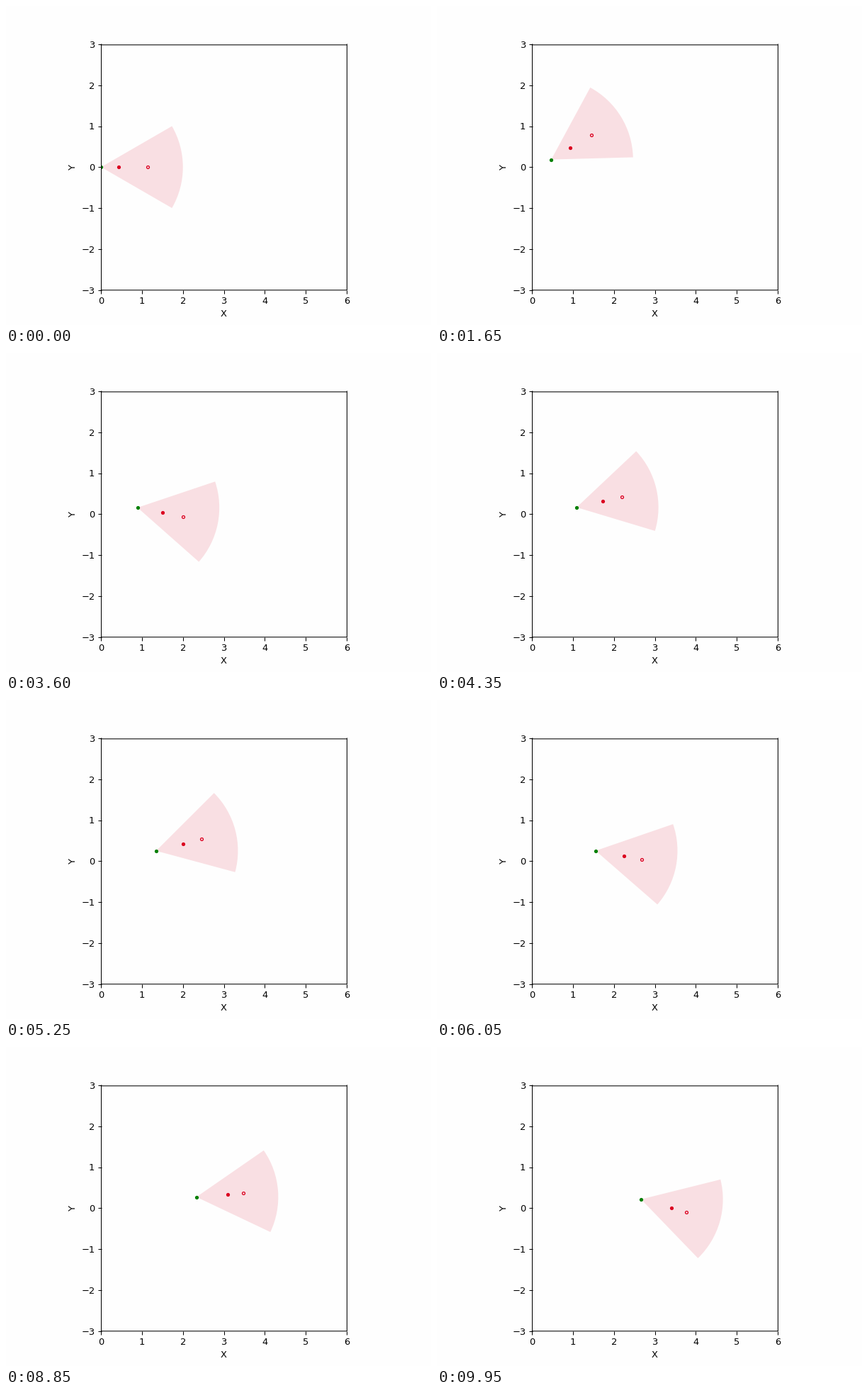
Recreate the animation shown at these times as a matplotlib script. Size 600 px wide and 450 px high, loop 10 s.

```python
import numpy as np
import matplotlib.pyplot as plt
from matplotlib.animation import FuncAnimation
from matplotlib.patches import Wedge

TICKS, TICK_MS = 200, 50
STEPS = 150            # poses per loop, 15 per second
RADIUS, HALF_FOV = 2.0, 30
AIM_DIST = 1.145
RED, PAPER = "#db0020", "#fefefe"

OMEGA = 2 * np.pi * 3 / (STEPS - 1)
SPEED, SWAY = 0.0201, 0.232


def target(k):
    return 0.42 + SPEED * k, SWAY * (1 - np.cos(OMEGA * k))


def gap(k):
    """Distance between the follower and the target."""
    return 0.85 - 0.43 * np.exp(-0.0122 * k)


def pursuit_angles(sub=10):
    """Bearing of a follower dragged behind the target, one per step."""
    angle, out = 0.0, []
    for i in range(STEPS * sub):
        if i % sub == 0:
            out.append(angle)
        k = (i + 0.5) / sub
        vy = SWAY * OMEGA * np.sin(OMEGA * k)
        turn = vy * np.cos(angle) - SPEED * np.sin(angle)
        angle += turn / gap(k) / sub
    return np.array(out)


steps = np.arange(STEPS)
heading = pursuit_angles()
tx, ty = target(steps)
rx = tx - gap(steps) * np.cos(heading)
ry = ty - gap(steps) * np.sin(heading)

fig, ax = plt.subplots(figsize=(6.4, 4.8), dpi=93.75, facecolor=PAPER)
ax.set_facecolor(PAPER)
ax.set_aspect("equal")
ax.set_xlim(0, 6)
ax.set_ylim(-3, 3)

# Soft, sub-pixel frame lines
for side, shift in dict(left=-0.2, right=0.5, bottom=0.23, top=-0.65).items():
    spine = ax.spines[side]
    spine.set_position(("outward", shift))
    spine.set_snap(False)
ax.set_xlabel("X")
ax.set_ylabel("Y")

view = Wedge((0, 0), RADIUS, -HALF_FOV, HALF_FOV, fc=RED, ec="none", alpha=0.12)
ax.add_patch(view)
robot, = ax.plot([], [], ".", color="green")
goal, = ax.plot([], [], ".", color=RED)
aim, = ax.plot([], [], ".", color=RED, mfc="none")
for dot in (robot, goal, aim):
    dot.set_snap(False)


def update(tick):
    k = int((tick + 0.5) * STEPS / TICKS)
    x, y, h = rx[k], ry[k], heading[k]
    view.set_center((x, y))
    view.set_theta1(np.degrees(h) - HALF_FOV)
    view.set_theta2(np.degrees(h) + HALF_FOV)
    robot.set_data([x], [y])
    goal.set_data([tx[k]], [ty[k]])
    aim.set_data([x + AIM_DIST * np.cos(h)], [y + AIM_DIST * np.sin(h)])
    return view, robot, goal, aim


anim = FuncAnimation(fig, update, frames=TICKS, interval=TICK_MS,
                     repeat=True, repeat_delay=0)
plt.show()
```
